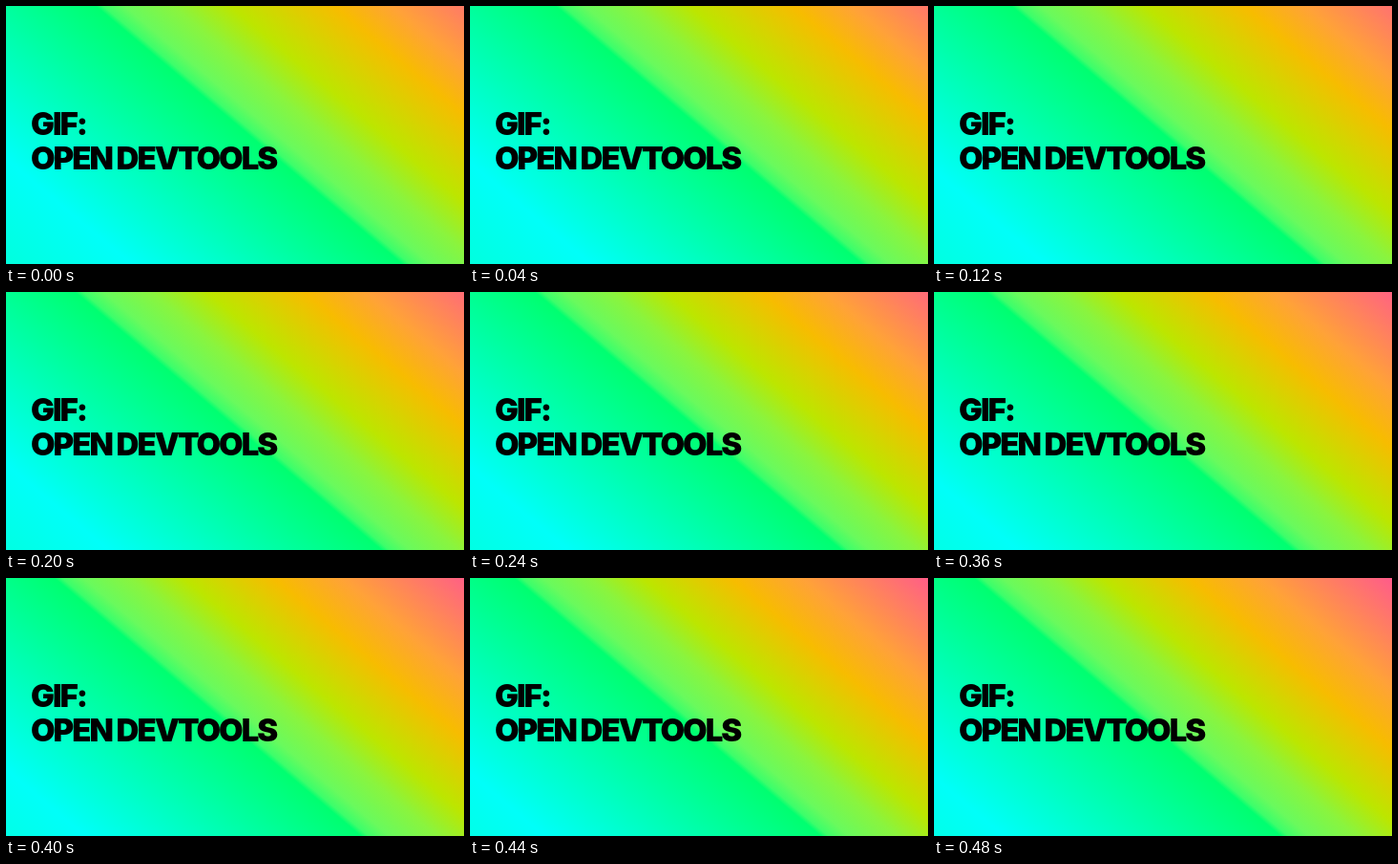
Write an HTML page with a canvas that moves like this. It is 480 px wide and 270 px high and loops after 520 ms.

```html
<!DOCTYPE html>
<html lang="en">
<head>
<meta charset="utf-8">
<title>Open DevTools</title>
<style>
  html, body { margin: 0; width: 100%; height: 100%; overflow: hidden; }
  canvas { display: block; }
  h1 {
    position: absolute;
    left: 26px;
    top: 106px;
    margin: 0;
    font: 900 33px/35.5px Inter, sans-serif;
    letter-spacing: -0.06em;
    white-space: nowrap;
    color: #000;
  }
</style>
</head>
<body>
<canvas width="480" height="270"></canvas>
<h1>GIF:<br>OPEN DEVTOOLS</h1>
<script>
const W = 480, H = 270;
const STEP = 40, STEPS = 13;
const SLANT = 1.19; // horizontal run of each colour band per pixel of height

// Where each colour meets the top edge at the first and last step.
const BANDS = [
  [-330, -388, '#00ffdc'],
  [-190, -248, '#00fff9'],
  [94, 42, '#00ff70'],
  [102, 50, '#3cfe6b'],
  [124, 72, '#69fa5d'],
  [175, 122, '#8af43e'],
  [235, 176, '#bce600'],
  [345, 268, '#f7bc00'],
  [405, 342, '#ffa238'],
  [540, 482, '#ff5a8c']
];

const ctx = document.querySelector('canvas').getContext('2d');
const axisPoint = s => {
  const k = s / (1 + SLANT * SLANT);
  return [k, -SLANT * k];
};

function draw(progress) {
  const stops = BANDS.map(([a, b, color]) => [a + (b - a) * progress, color]);
  const start = stops[0][0];
  const end = stops[stops.length - 1][0];
  const gradient = ctx.createLinearGradient(...axisPoint(start), ...axisPoint(end));
  for (const [s, color] of stops) {
    gradient.addColorStop((s - start) / (end - start), color);
  }
  ctx.fillStyle = gradient;
  ctx.fillRect(0, 0, W, H);
}

function tick() {
  const step = Math.floor(performance.now() / STEP) % STEPS;
  draw(step / (STEPS - 1));
  requestAnimationFrame(tick);
}
tick();
</script>
</body>
</html>
```
